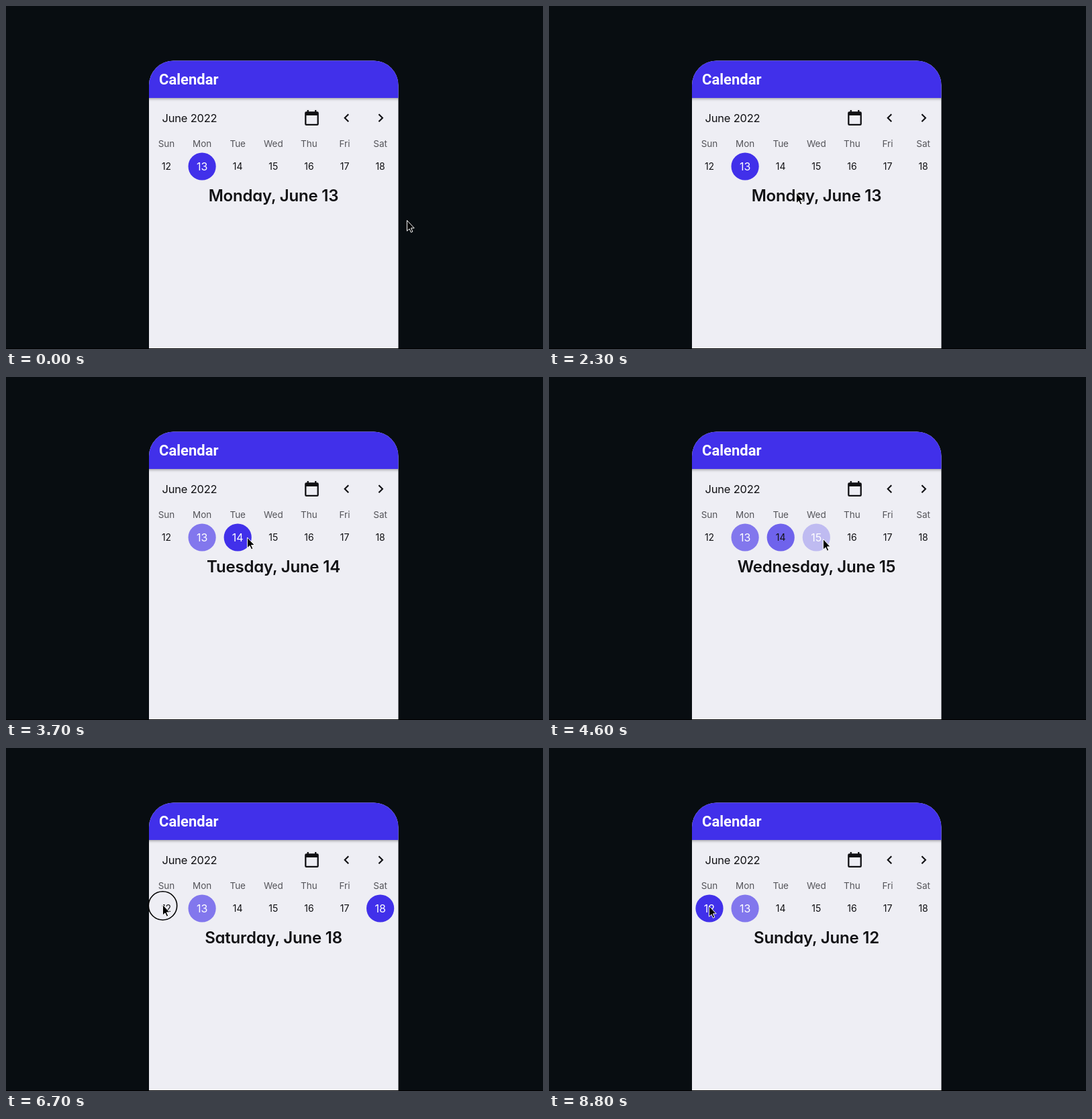
Recreate the animation shown at these times as an HTML page. Size 800x511 px, loop 8900 ms.

```html
<!DOCTYPE html>
<html lang="en">
<head>
<meta charset="utf-8">
<title>Calendar</title>
<style>
  html, body { margin: 0; width: 100%; height: 100%; overflow: hidden; background: #080d11; }
  svg { display: block; width: 100vw; height: 100vh; }
  text { font-family: Inter, "Open Sans", sans-serif; fill: #111114; }
  .title { font: 700 22px Roboto, sans-serif; fill: #fff; }
  .month { font-size: 16.5px; letter-spacing: -.2px; }
  .centered { text-anchor: middle; }
  .weekday { font-size: 13.5px; fill: #545459; }
  .date { font-size: 14px; }
  .date.active { font-size: 16px; fill: #fff; }
  .headline { font-size: 24px; font-weight: 600; letter-spacing: -.2px; font-feature-settings: "cv11"; }
  .header, .disc { fill: #4130ea; }
  .header { filter: drop-shadow(0 1.5px 2px rgba(0, 0, 0, .4)); }
</style>
</head>
<body>
<svg viewBox="0 0 800 511">
  <defs>
    <clipPath id="panel"><path d="M213 511V118a36.5 36.5 0 0 1 36.5-36.5H548A36.5 36.5 0 0 1 584.5 118V511Z"/></clipPath>
  </defs>
  <rect width="800" height="511" fill="#080d11"/>
  <g clip-path="url(#panel)">
    <rect x="213" y="81" width="372" height="430" fill="#eeeef4"/>
    <rect class="header" x="205" y="76" width="388" height="61"/>
  </g>
  <text class="title" x="228" y="117">Calendar</text>
  <text class="month" x="232.5" y="173">June 2022</text>
  <g fill="#111114">
    <path transform="translate(441.7 153.8) scale(1.15)" d="M19 19H5V8H19ZM16 1V3H8V1H6V3H5A2 2 0 0 0 3 5V19A2 2 0 0 0 5 21H19A2 2 0 0 0 21 19V5A2 2 0 0 0 19 3H18V1Z" fill-rule="evenodd"/>
    <path id="chevron" d="M511 171.6L506.2 166.8L511 162L509.5 160.5L503.2 166.8L509.5 173.1Z"/>
    <use href="#chevron" transform="translate(1065.6) scale(-1 1)"/>
  </g>
  <g id="week"></g>
  <text id="headline" class="headline centered" x="398.5" y="291"></text>
  <circle id="ring" r="21.2" fill="none" stroke="#000" stroke-width="1.6"/>
  <path id="cursor" d="M.4 .4V16.2L4 12.9L6.4 18.2L8.8 17.1L6.4 11.9H11.2Z" fill="#000" stroke="#fff"/>
  <rect y="510" width="800" height="1" fill="#000"/>
</svg>
<script>
const LOOP = 8900, STEP = 100, FADE = 350;
const TODAY = 1, TODAY_ALPHA = .62;
const days = ['Sunday', 'Monday', 'Tuesday', 'Wednesday', 'Thursday', 'Friday', 'Saturday'];

// Selections: time, day index
const picks = [[-FADE, 1], [3075, 2], [4505, 3], [5622, 6], [6720, 0]];

// Pointer stops: time, x, y
const stops = [
  [0, 597, 319], [300, 597, 319], [1250, 398, 279], [2100, 372, 285],
  [2900, 347, 238], [3500, 347, 238], [4200, 408, 241], [4800, 408, 241],
  [5100, 595, 247], [5400, 561, 243], [6100, 561, 243], [6600, 233, 233],
  [8700, 233, 233], [8800, 238, 235], [LOOP, 238, 235]
];

const byId = id => document.getElementById(id);
const week = byId('week'), headline = byId('headline');
const ring = byId('ring'), cursor = byId('cursor');
const mix = (a, b, p) => a + (b - a) * p;
const ease = p => p * p * (3 - 2 * p);

function add(tag, attrs, text = '') {
  const node = document.createElementNS('http://www.w3.org/2000/svg', tag);
  for (const key in attrs) node.setAttribute(key, attrs[key]);
  node.textContent = text;
  return week.appendChild(node);
}

const cells = days.map((name, i) => {
  const x = 239 + 53.1 * i;
  add('text', { class: 'weekday centered', x, y: 210 }, name.slice(0, 3));
  return {
    disc: add('circle', { class: 'disc', cx: x, cy: 239, r: 20.6 }),
    date: add('text', { x, y: 244 }, 12 + i)
  };
});

function pointerAt(t) {
  const i = stops.findIndex(stop => t < stop[0]);
  const [t0, x0, y0] = stops[i - 1], [t1, x1, y1] = stops[i];
  const p = ease((t - t0) / (t1 - t0));
  return [mix(x0, x1, p), mix(y0, y1, p)];
}

function draw(t) {
  const current = picks.filter(pick => pick[0] <= t).length - 1;
  const [since, selected] = picks[current];
  const previous = current ? picks[current - 1][1] : selected;
  const progress = Math.min(1, (t - since) / FADE);
  const alpha = (day, chosen) => day === chosen ? 1 : day === TODAY ? TODAY_ALPHA : 0;

  cells.forEach(({ disc, date }, day) => {
    const active = day === selected || day === TODAY;
    disc.setAttribute('opacity', mix(alpha(day, previous), alpha(day, selected), progress));
    date.setAttribute('class', 'date centered' + (active ? ' active' : ''));
    date.setAttribute('y', active ? 245 : 244);
  });
  headline.textContent = `${days[selected]}, June ${12 + selected}`;

  const [x, y] = pointerAt(t);
  const pressed = picks.some(([time]) => time >= t && time < t + STEP);
  cursor.setAttribute('transform', `translate(${x} ${y})`);
  ring.setAttribute('transform', `translate(${x + .5} ${y + 2})`);
  ring.setAttribute('visibility', pressed ? 'visible' : 'hidden');
}

const start = performance.now();
function tick() {
  const t = (performance.now() - start) % LOOP;
  draw(Math.floor(t / STEP) * STEP);
  requestAnimationFrame(tick);
}
tick();
</script>
</body>
</html>
```
